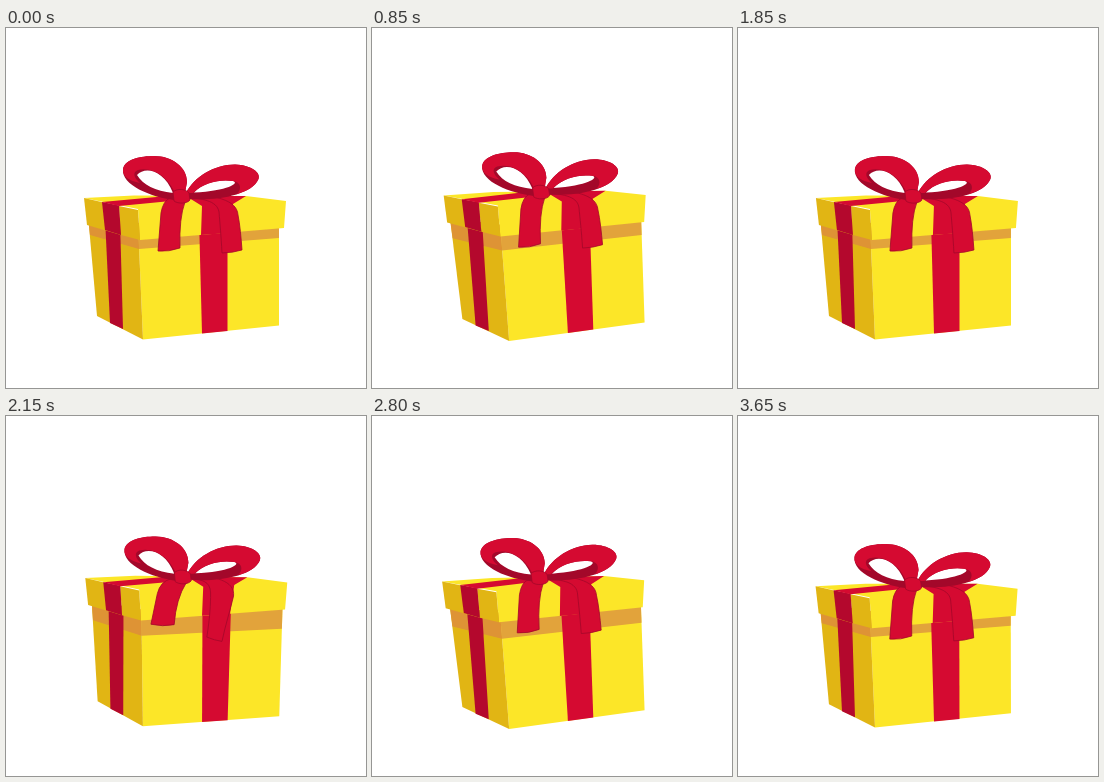
An HTML page with a canvas for the animation above (3.7 s loop, 360 px wide and 360 px high).

```html
<!DOCTYPE html>
<html lang="en">
<head>
<meta charset="utf-8">
<title>Gift box</title>
<style>
html, body { margin: 0; width: 100%; height: 100%; overflow: hidden; background: #fff; }
canvas { display: block; width: 360px; height: 360px; }
</style>
</head>
<body>
<canvas id="stage" width="360" height="360"></canvas>
<script>
const ctx = document.getElementById('stage').getContext('2d');
const LOOP = 3700, STEP = 50, CYCLE = 1900;
const YELLOW = '#fce628', SIDE = '#e1b514', RED = '#d50a31', SIDE_RED = '#b4082d',
      DARK = '#a3082a', SHADE = '#e2a33b', SIDE_SHADE = '#de9335';

const progress = (p, from, to) => Math.min(1, Math.max(0, (p - from) / (to - from)));
const ease = (p, from, to) => {
  const u = progress(p, from, to);
  return u * u * (3 - 2 * u);
};
const easeOut = (p, from, to) => 1 - (1 - progress(p, from, to)) ** 1.6;
const hop = (p, peak) => Math.exp(-(((p - peak) / 112) ** 2));

// The box leans right, then left, then settles; the lid hops at each extreme.
function poseAt(p) {
  return {
    tilt: 2 * ease(p, 0, 330) - 4 * ease(p, 520, 880) + 2 * ease(p, 950, CYCLE),
    x: 3 * ease(p, 50, 500) - 11.2 * ease(p, 600, 940) + 8.2 * easeOut(p, 930, CYCLE),
    y: -7.4 * hop(p, 265) - 7.2 * hop(p, 930),
    lidTilt: .5 * ease(p, 0, 350) - 2.2 * ease(p, 350, 1150) + 1.7 * ease(p, 1200, CYCLE),
    swing: ease(p, 0, 350) - ease(p, 600, 850)
  };
}

function poly(color, ...p) {
  ctx.beginPath();
  for (let i = 0; i < p.length; i += 2) ctx.lineTo(p[i], p[i + 1]);
  ctx.closePath();
  ctx.fillStyle = color;
  ctx.fill();
}

function shape(path, color, line) {
  const p = new Path2D(path);
  ctx.fillStyle = color;
  ctx.fill(p, 'evenodd');
  if (line) {
    ctx.strokeStyle = line;
    ctx.lineWidth = .8;
    ctx.stroke(p);
  }
}

function turned(cx, cy, deg, dx, dy, draw) {
  ctx.save();
  ctx.translate(cx + dx, cy + dy);
  ctx.rotate(deg * Math.PI / 180);
  ctx.translate(-cx, -cy);
  draw();
  ctx.restore();
}

function drawBody() {
  poly(YELLOW, 132, 195, 273, 185, 273, 297.5, 137, 311.5);
  poly(SIDE, 82, 187, 132, 195, 137, 311.5, 91, 288);
  // inner rim below the lid
  poly(SHADE, 132, 195, 273, 185, 273, 210, 133, 221);
  poly(SIDE_SHADE, 82, 187, 132, 195, 133, 221, 84, 207);
  poly(RED, 193, 190, 221.5, 188, 221.5, 303, 196, 305.5);
  poly(SIDE_RED, 99, 190, 114, 192, 117, 301, 104, 295);
}

function drawLid() {
  poly(YELLOW, 78, 170, 128, 167.5, 240, 168, 280, 173, 278, 200, 134, 212, 132, 181);
  poly(SIDE, 78, 170, 113, 178, 115, 207, 81, 197);
  poly(SIDE, 113, 178, 132, 182, 134, 212, 115, 207);
  poly(SIDE_RED, 96, 174, 113, 177.5, 115, 207, 99, 202);
  poly(RED, 96, 174, 156, 168.5, 178, 169, 165, 173, 113, 178);
  // front ribbon, running back over the top to the knot
  poly(RED, 180, 168, 240, 168, 227, 176, 223, 205, 195, 207, 196, 178);
}

function drawTails(s) {
  const at = (a, b) => (a + (b - a) * s).toFixed(2);
  const left = `M164 170 Q${at(157, 152)} 173 ${at(155, 149)} 185
    L${at(152, 142)} ${at(223, 214)} Q${at(163, 154)} ${at(224, 217)} ${at(174, 165.5)} ${at(220, 215)}
    Q${at(173, 168)} 190 179 174 Z`;
  const right = `M180 169 C195 171 ${at(211, 201)} 172 ${at(213, 201)} 184
    C${at(214, 201)} 196 ${at(215, 200)} 207 ${at(216, 196)} ${at(225, 229)}
    Q${at(226, 203)} ${at(225, 233)} ${at(236, 210)} ${at(222, 235)}
    C${at(235, 214)} ${at(209, 219)} ${at(234, 220)} ${at(197, 204)} ${at(232, 225)} 187
    C${at(231, 227)} 171 207 168 183 165 Z`;
  shape(left, RED, DARK);
  shape(right, RED, DARK);
}

function drawBow() {
  // each loop: dark inside first, bright outer band over it
  shape(`M117 141 C119 131 135 128 148 128 C166 128 181 139 181 154 L178 170 L168 172
    C145 169 115 157 117 141 Z
    M131 147 C139 138 158 142 167 165 C149 163 137 157 131 147 Z`, DARK);
  shape(`M117 141 C119 131 135 128 148 128 C166 128 181 139 181 154 L178 170 L170 168
    C164 150 147 138 132 142 C126 144 128 150 134 155 C123 153 116 148 117 141 Z`, RED);
  shape(`M180 165 C188 149 208 136.5 229 136.5 C246 137 255 145 252.5 151
    C246 167 211 173 183 171 Z
    M188 164.5 C198 154 215 151 227 153 C234 155 222 163 188 164.5 Z`, DARK);
  shape(`M180 165 C188 149 208 136.5 229 136.5 C246 137 255 145 252.5 151
    C249 159 241 163 231 166 C236 161 235 154 227 153 C215 151 198 154 187 165 Z`, RED);
  shape('M167 164 C171 160 180 161 183 165 L184 172 C181 176 172 176 168 173 Z', RED, DARK);
}

function draw(t) {
  const pose = poseAt(t % CYCLE);
  ctx.fillStyle = '#fff';
  ctx.fillRect(0, 0, 360, 360);
  turned(180, 308, pose.tilt, 0, 0, drawBody);
  turned(180, 175, pose.lidTilt, pose.x, pose.y, () => {
    drawLid();
    drawTails(pose.swing);
    drawBow();
  });
}

const start = performance.now();
function tick() {
  const t = (performance.now() - start) % LOOP;
  draw(Math.floor(t / STEP) * STEP);
  requestAnimationFrame(tick);
}
tick();
</script>
</body>
</html>
```
